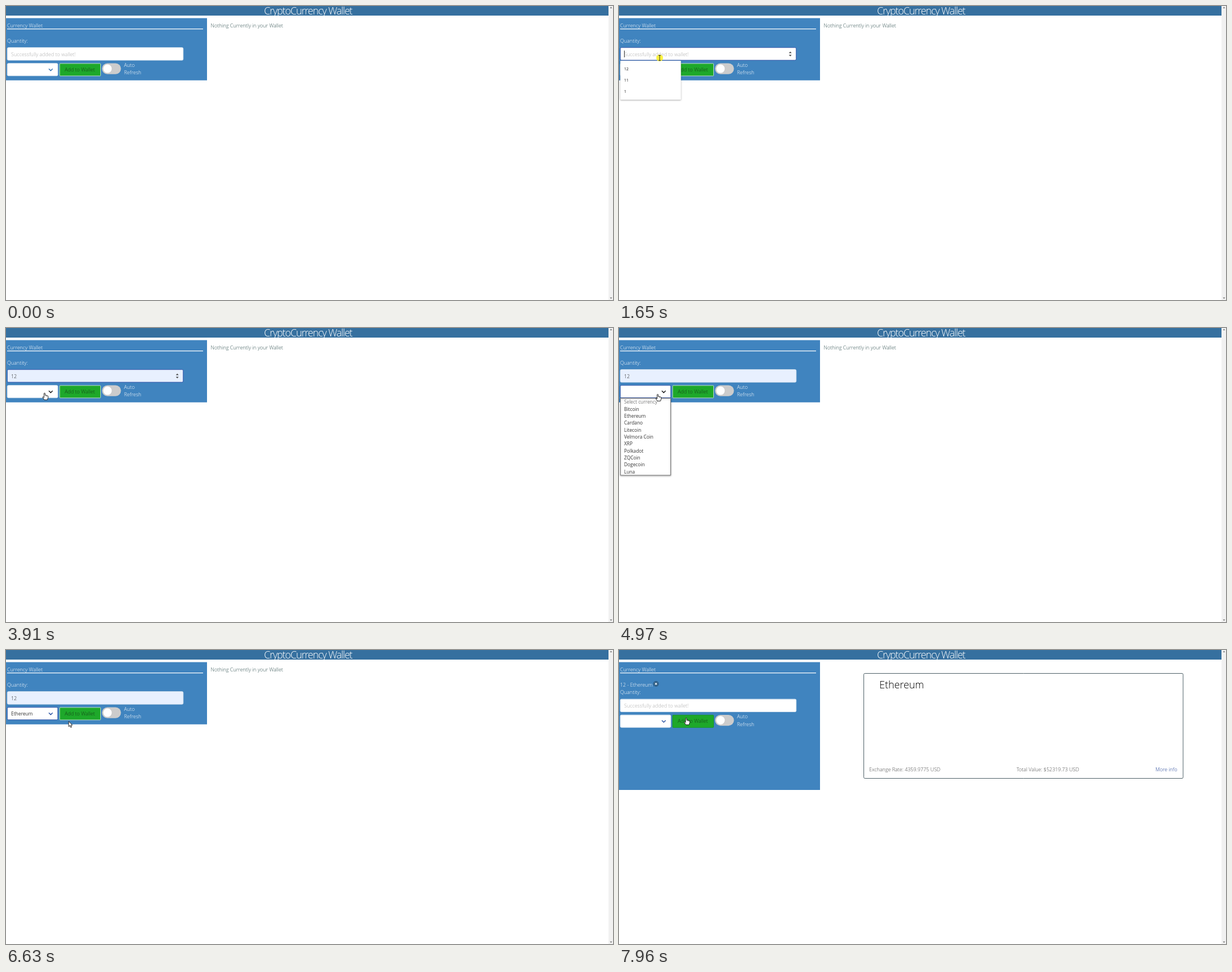
Recreate the animation shown at these times as an HTML page with a canvas. Size 1075 by 521 pixels, loop 8000 ms.

```html
<!DOCTYPE html>
<html lang="en">
<head>
<meta charset="utf-8">
<title>CryptoCurrency Wallet</title>
<style>
html, body { margin: 0; width: 100%; height: 100%; overflow: hidden; background: #fff; }
canvas { display: block; }
</style>
</head>
<body>
<canvas id="stage" width="1075" height="521"></canvas>
<script>
const ctx = document.getElementById('stage').getContext('2d');
const LOOP = 8000, TICK = 66.3;
const NAVY = '#2f56a5';
const COINS = ['Select currency', 'Bitcoin', 'Ethereum', 'Cardano', 'Litecoin', 'Velmora Coin',
  'XRP', 'Polkadot', 'ZQCoin', 'Dogecoin', 'Luna'];

// Pointer moves: start, end, target x, target y
const MOVES = [
  [460, 1250, 72, 98], [1250, 1380, 72, 92], [1915, 2310, 57, 103], [3515, 3980, 69, 116],
  [4905, 5500, 54.5, 155.5], [6294, 6630, 111, 126.5], [6630, 6890, 119, 114],
  [7030, 7090, 119, 113.5], [7895, 7950, 119, 120.5]
];
const CLICKS = [1650, 3050, 4250, 5830, 7430];

const within = (t, a, b) => t >= a && t < b;

function rect(x, y, w, h, fill, radius = 0, stroke) {
  ctx.beginPath();
  ctx.roundRect(x, y, w, h, radius);
  paint(fill, stroke);
}

function circle(x, y, r, fill) {
  ctx.beginPath();
  ctx.arc(x, y, r, 0, 7);
  paint(fill);
}

function line(points, color, width = 1) {
  ctx.beginPath();
  points.forEach(([x, y]) => ctx.lineTo(x, y));
  ctx.lineWidth = width;
  ctx.strokeStyle = color;
  ctx.stroke();
}

function shape(points, fill, stroke) {
  ctx.beginPath();
  points.forEach(([x, y]) => ctx.lineTo(x, y));
  ctx.closePath();
  paint(fill, stroke);
}

function paint(fill, stroke) {
  if (fill) { ctx.fillStyle = fill; ctx.fill(); }
  if (stroke) { ctx.lineWidth = 1; ctx.strokeStyle = stroke; ctx.stroke(); }
}

function text(str, x, y, color, size = 8.96, weight = 300, spacing = 0) {
  ctx.font = `${weight} ${size}px "Open Sans", sans-serif`;
  ctx.letterSpacing = spacing + 'px';
  ctx.fillStyle = color;
  ctx.fillText(str, x, y);
}

function shadowed(draw) {
  ctx.save();
  ctx.shadowColor = 'rgba(0,0,0,.35)';
  ctx.shadowBlur = 3;
  ctx.shadowOffsetY = 1;
  draw();
  ctx.restore();
}

function pointerAt(t) {
  const now = Math.floor((t + 8) / TICK) * TICK;
  let x = 949, y = 504;
  for (const [start, end, toX, toY] of MOVES) {
    const u = Math.min(1, Math.max(0, (now - start) / (end - start)));
    const k = u * u * (3 - 2 * u);
    x += (toX - x) * k;
    y += (toY - y) * k;
  }
  return [x, y];
}

function drawPage(t, added) {
  rect(0, 0, 1067, 17, '#36709f');
  text('CryptoCurrency Wallet', 457, 15, '#fff', 17.92, 300, -1.12);
  rect(1067, 0, 8, 521, '#f1f1f1');
  shape([[1069.5, 4], [1071.5, 1.5], [1073.5, 4]], '#777');
  shape([[1069.5, 516.5], [1071.5, 519], [1073.5, 516.5]], '#777');

  const bottom = t >= 7950 ? 248 : added ? 145 : 131.7;
  rect(0, 21.5, 356, bottom - 21.5, '#4084bf');
  text('Currency Wallet', 2, 38, '#fff');
  rect(2, 40, 347, 1.2, '#fff');
  if (!added) text('Nothing Currently in your Wallet', 362.5, 38, '#2f4f4f');
  if (t >= 7950) drawCard();
}

function drawCard() {
  rect(433.5, 41.5, 565.5, 186, '#fff', 2, '#4d5f66');
  text('Ethereum', 461, 68, '#000', 17.92);
  text('Exchange Rate: 4359.9775 USD', 443, 215, '#444');
  text('Total Value: $52319.73 USD', 704, 215, '#444');
  text('More info', 950, 215, '#1d3f94');
}

function drawForm(t, added, pointer) {
  const filled = within(t, 2050, 7550);
  const focused = within(t, 1650, 4245);
  ctx.save();
  if (added) {
    text('12 - Ethereum', 2, 64.5, '#fff');
    circle(65.5, 60, 5, '#2f5f87');
    line([[63.8, 58.3], [67.2, 61.7]], '#fff', 1.2);
    line([[67.2, 58.3], [63.8, 61.7]], '#fff', 1.2);
    ctx.translate(0, 13.44);
  }
  text('Quantity:', 2, 64.5, '#fff');

  rect(2.3, 73.7, 311.5, 22.4, filled ? '#e8f0fe' : '#fff', 2, focused ? '#3556a8' : '#dbe6f0');
  if (filled) text('12', 9, 88.7, '#222');
  else text('Successfully added to wallet!', 9, 88.7, '#aaa');
  if (within(t, 1320, 4245)) {
    shape([[300.8, 83.5], [303.3, 80.7], [305.8, 83.5]], '#444');
    shape([[300.8, 86.5], [303.3, 89.3], [305.8, 86.5]], '#444');
  }
  const blinkOn = t < 3050 ? Math.floor((t - 1650) / 530) % 2 === 0 : t < 3580;
  if (focused && blinkOn) rect(t < 3050 ? 9 : 18, 79, 1, 12, '#333');

  const selectFocused = within(t, 4245, 7430);
  rect(2.3, 101.7, 89.4, 22, '#fff', 2, selectFocused ? '#3556a8' : '#dbe6f0');
  if (within(t, 5955, 7550)) text('Ethereum', 9, 116, '#333', 8.35, 400);
  const chevron = within(t, 3580, 5955) ? '#222' : t >= 5955 ? NAVY : '#3a76b5';
  line([[75.8, 111.3], [79.2, 114.6], [82.6, 111.3]], chevron, 1.5);

  const hover = t >= 6760;
  rect(95, 101.9, 72.5, 22, '#1ea82a', 1, hover ? '#18962a' : '#b9dfc4');
  text('Add to Wallet', 104, 116, '#143a17');

  rect(170, 101.5, 33.6, 19.2, '#ccc', 9.6);
  circle(179.8, 111.1, 7.5, '#fff');
  text('Auto', 209, 108, '#fff');
  text('Refresh', 209, 121.4, '#fff');
  ctx.restore();

  if (within(t, 1645, 3385)) drawSuggestions(t);
  if (within(t, 4310, 5955)) drawOptions(t, pointer);
}

function drawSuggestions(t) {
  ctx.save();
  ctx.globalAlpha = t < 3175 ? 1 : t < 3245 ? 0.72 : t < 3315 ? 0.4 : 0.15;
  shadowed(() => rect(2.3, 97, 107.4, 69, '#fff', 1));
  if (t >= 2050) rect(2.3, 101, 107.4, 20.3, '#e8e8e8');
  ['12', '11', '1'].forEach((s, i) => text(s, 9, 113.8 + i * 20.3, '#111', 6.8, 400));
  ctx.restore();
}

function drawOptions(t, [, py]) {
  shadowed(() => rect(2.5, 124.5, 89, 136.5, '#fff', 0, '#777'));
  const hovered = t > 4980 ? Math.floor((py - 125) / 12.38) : -1;
  COINS.forEach((name, i) => {
    const active = i === hovered && i > 0;
    if (active) rect(3, 125 + i * 12.38, 88, 12.38, '#1967d2');
    text(name, 9, 134.2 + i * 12.36, active ? '#fff' : i ? '#333' : '#777', 8.35, 400);
  });
}

function drawPointer(t, [x, y]) {
  if (t < 455) return;
  if (CLICKS.some(c => within(t, c - 5, c + 125))) circle(x, y, 6, 'rgba(250,240,30,.85)');
  ctx.save();
  ctx.translate(x, y);
  const hand = within(t, 3650, 5030) || within(t, 6760, 7550) || t >= 7950;
  if (within(t, 1315, 2050)) {
    line([[-2, -4.5], [2, -4.5]], '#333');
    line([[0, -4.5], [0, 4.5]], '#333');
    line([[-2, 4.5], [2, 4.5]], '#333');
  } else if (hand) {
    ctx.lineJoin = 'round';
    shape([[-1, 0.5], [0, 0], [1, 0.5], [1, 4], [3, 4], [6, 5.2], [6.3, 8], [5, 12],
      [-0.5, 12], [-3.5, 7.5], [-2.8, 6.5], [-1, 8]], '#fff', '#222');
    line([[3, 4.5], [3, 6.5]], '#222', 0.6);
  } else {
    shape([[0, 0], [0, 9.2], [2.1, 7.3], [3.7, 10.7], [5.3, 10], [3.8, 6.7], [6.6, 6.5]], '#fff', '#222');
  }
  ctx.restore();
}

function render(now) {
  const t = now % LOOP;
  const pointer = pointerAt(t);
  const added = t >= 7550;
  ctx.fillStyle = '#fff';
  ctx.fillRect(0, 0, 1075, 521);
  drawPage(t, added);
  drawForm(t, added, pointer);
  drawPointer(t, pointer);
}

const begin = performance.now();
function loop() {
  render(performance.now() - begin);
  requestAnimationFrame(loop);
}
loop();
</script>
</body>
</html>
```
